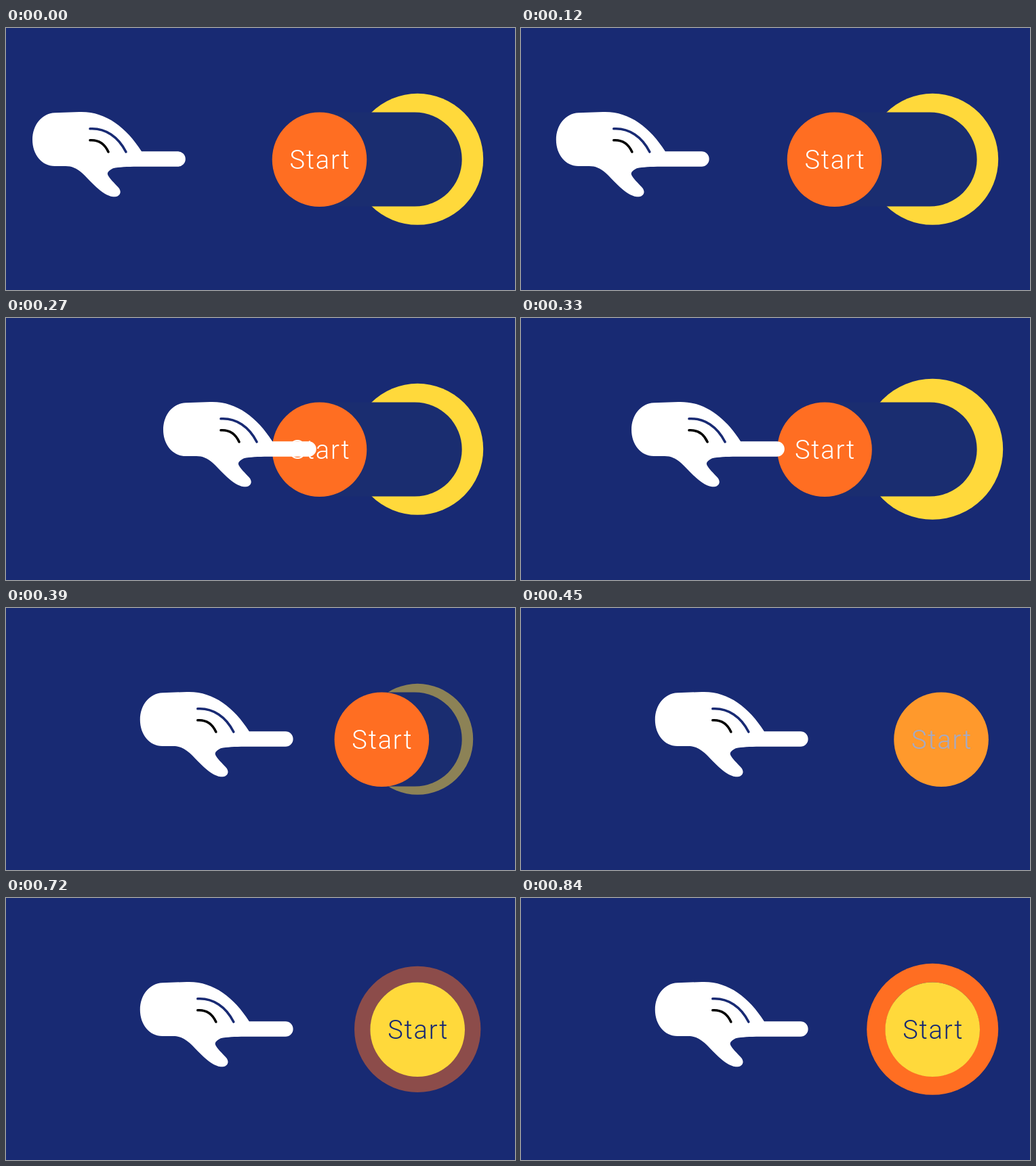
Write an HTML page that moves like this. It is 751 by 387 pixels and loops after 870 ms.

```html
<!DOCTYPE html>
<html lang="en">
<head>
<meta charset="utf-8">
<title>Start toggle</title>
<style>
  html, body { margin: 0; width: 100%; height: 100%; overflow: hidden; background: #182a73; }
  svg { display: block; width: 100vw; height: 100vh; }
  text { font: 300 38px Roboto, sans-serif; letter-spacing: 1.8px; text-anchor: middle; }
  .line { fill: none; stroke-width: 3.6; stroke-linecap: round; }
</style>
</head>
<body>
<svg viewBox="0 0 751 387">
  <circle id="ring" cx="607.2" cy="193.8"/>
  <line id="track" y1="194" y2="194" stroke="#1a2d70" stroke-width="139" stroke-linecap="round"/>
  <g id="ball">
    <circle id="disc" cy="194.3" r="69.8"/>
    <text id="label" x="1" y="207.5">Start</text>
  </g>
  <g id="hand">
    <path fill="#fff" d="M72 125.2 L108 124 C146 122.5 177 146 200 182.2 H253.5
      A11.3 11.3 0 0 1 253.5 204.8 H194 C178 204.8 167 205.6 158 207.2 C151 211 148 214 151 218.5
      C155 225 163 232 167 237 C172 245 165 250 158 249.3 C141 247 125 226 112 214
      C104 207 97 204 88 204 H72 C53 204 39 187 39 165 C39 143 53 126 72 125.2Z"/>
    <path class="line" stroke="#182a73" d="M124 148.8 C147 147.5 166 161 177 183"/>
    <path class="line" stroke="#000" d="M124 165.8 C137 165 146 172 151 183"/>
  </g>
</svg>
<script>
const LOOP = 870, STEP = 30;
const NAVY = [24, 42, 115], WHITE = [255, 255, 255];
const ORANGE = [255, 110, 34], YELLOW = [255, 217, 59];

const $ = id => document.getElementById(id);
const [ring, track, ball, disc, label, hand] =
  ['ring', 'track', 'ball', 'disc', 'label', 'hand'].map($);

const span = (t, from, dur) => Math.min(1, Math.max(0, (t - from) / dur));
const lerp = (a, b, k) => a + (b - a) * k;
const mix = (a, b, k) => `rgb(${a.map((v, i) => Math.round(lerp(v, b[i], k)))})`;

const inOutCubic = k => k < 0.5 ? 4 * k ** 3 : 1 - 4 * (1 - k) ** 3;
const inBack = (k, s) => k * k * ((s + 1) * k - s);
const inOutBack = (k, s) =>
  k < 0.5 ? inBack(2 * k, s) / 2 : 1 - inBack(2 - 2 * k, s) / 2;

const set = (el, attrs) => {
  for (const name in attrs) el.setAttribute(name, attrs[name]);
};

// Lunge, pull back, settle.
function handX(t) {
  return 205 * inOutCubic(span(t, 90, 120))
    - 81 * inOutCubic(span(t, 240, 90))
    + 34.8 * inOutCubic(span(t, 330, 60));
}

// The ring shrinks behind the ball, then springs out again in the other colour.
function ringState(t) {
  const out = t > 600;
  const grow = out ? span(t, 697, 123) : span(t, 277, 123);
  const back = inBack(out ? 1 - grow : grow, 3.2);
  return {
    r: lerp(97, 70, back),
    opacity: out ? span(t, 690, 60) : 1 - span(t, 360, 60),
    fill: mix(YELLOW, ORANGE, out ? 1 : 0)
  };
}

function draw(t) {
  const x = lerp(462.5, 607.2, inOutBack(span(t, 279, 211), 2.595));
  const swap = span(t, 390, 150);
  set(hand, { transform: `translate(${handX(t)} 0)` });
  set(ball, { transform: `translate(${x} 0)` });
  set(disc, { fill: mix(ORANGE, YELLOW, swap) });
  set(label, { fill: mix(WHITE, NAVY, swap) });
  set(track, { x1: x, x2: Math.max(x, 603.2) });
  set(ring, ringState(t));
}

const start = performance.now();
function tick() {
  const t = (performance.now() - start) % LOOP;
  draw(Math.floor(t / STEP) * STEP);
  requestAnimationFrame(tick);
}
tick();
</script>
</body>
</html>
```
